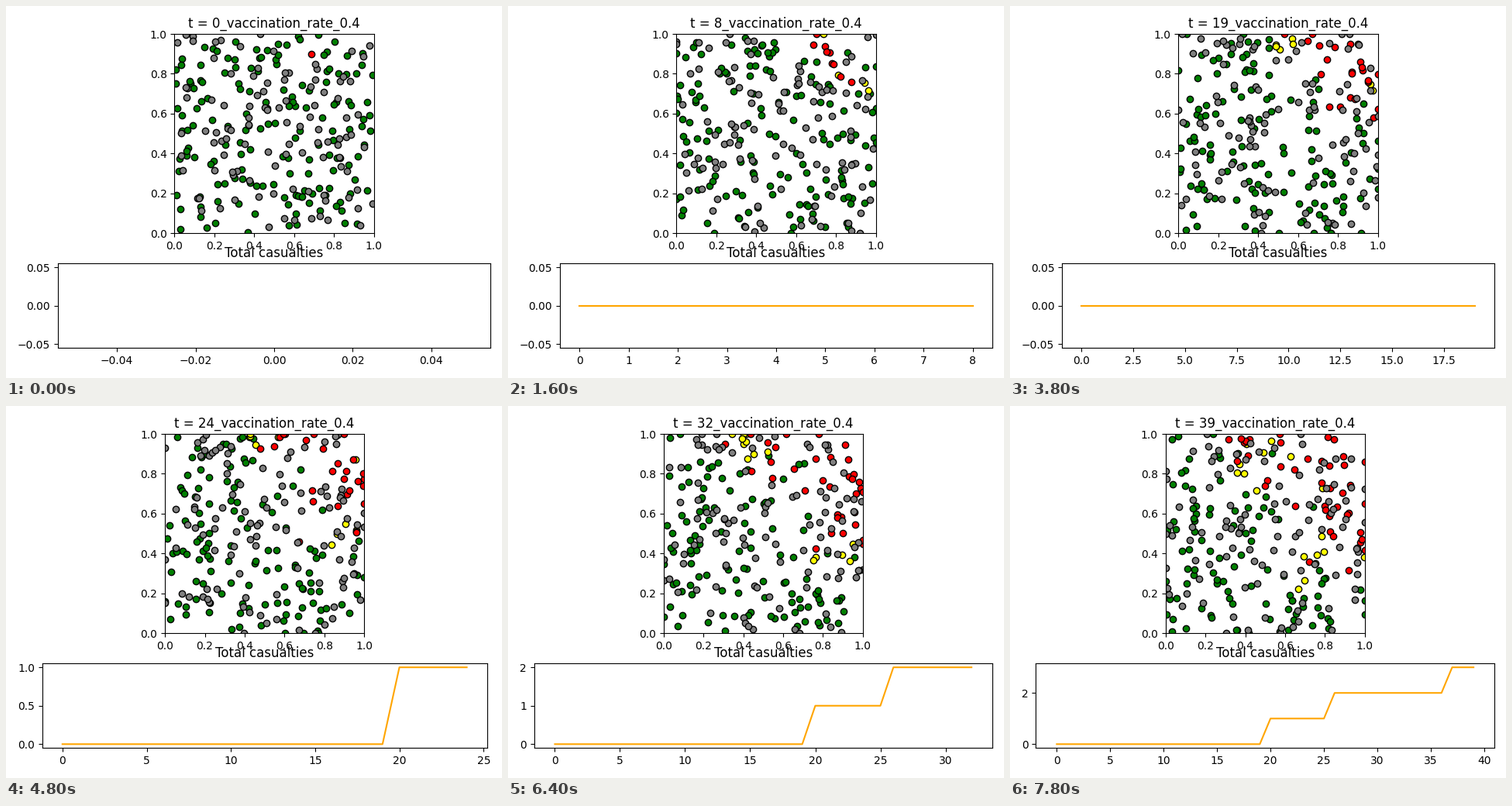
Animation of 640x480 px, one loop 8000 ms. Source, as a matplotlib script:

```python
import numpy as np
import matplotlib.pyplot as plt
from matplotlib.animation import FuncAnimation

STEPS = 40
OPEN, IMMUNE = 160, 105     # agents that can and cannot catch it
STRIDE = 0.05
INFECT_RATE, SICK_RATE = 1.55, 1.12
DEATH_TIMES = [20, 26, 37]

times = np.arange(STEPS)
infected = 1 + (INFECT_RATE * times).astype(int)
sick = 1 + (SICK_RATE * times).astype(int)
deaths = [sum(t >= d for d in DEATH_TIMES) for t in times]


def random_walks(rng):
    """Uniform start, then small steps that stop at the walls."""
    pos = rng.random((STEPS, OPEN + IMMUNE, 2))
    pos[0, 0] = 0.685, 0.90
    for t in range(1, STEPS):
        step = rng.uniform(-STRIDE, STRIDE, pos[t].shape)
        pos[t] = np.clip(pos[t - 1] + step, 0, 1)
    return pos


def infection_order(pos):
    """Agent 0 is the first carrier; the closest healthy agent is next."""
    order = [0]
    for t in times:
        while len(order) < infected[t]:
            rest = [k for k in range(OPEN) if k not in order]
            diff = pos[t, rest][:, None] - pos[t, order][None]
            dist = np.hypot(diff[..., 0], diff[..., 1]).min(axis=1)
            order.append(rest[int(dist.argmin())])
    return order


pos = random_walks(np.random.default_rng(7))
order = infection_order(pos)

fig = plt.figure(figsize=(6.4, 4.8), dpi=100)


def update(t):
    fig.clf()
    grid = fig.add_gridspec(3, 1)
    field = fig.add_subplot(grid[:2])
    chart = fig.add_subplot(grid[2])

    groups = {
        "green": [k for k in range(OPEN) if k not in order[:infected[t]]],
        "yellow": order[sick[t]:infected[t]],
        "red": order[deaths[t]:sick[t]],
        "gray": range(OPEN, OPEN + IMMUNE),
    }
    for color, group in groups.items():
        x, y = pos[t, list(group)].T
        field.plot(x, y, "o", color=color, markeredgecolor="black")
    field.set(xlim=(0, 1), ylim=(0, 1), aspect="equal")
    field.set_title(f"t = {t}_vaccination_rate_0.4")

    chart.plot(times[:t + 1], deaths[:t + 1], color="orange")
    # The sides follow the tick labels; the heights stay fixed.
    fig.tight_layout()
    fig.subplots_adjust(top=0.925, hspace=0.358)
    chart.set_title("Total casualties")


anim = FuncAnimation(fig, update, frames=STEPS, interval=200,
                     repeat=True, repeat_delay=0)
plt.show()
```
